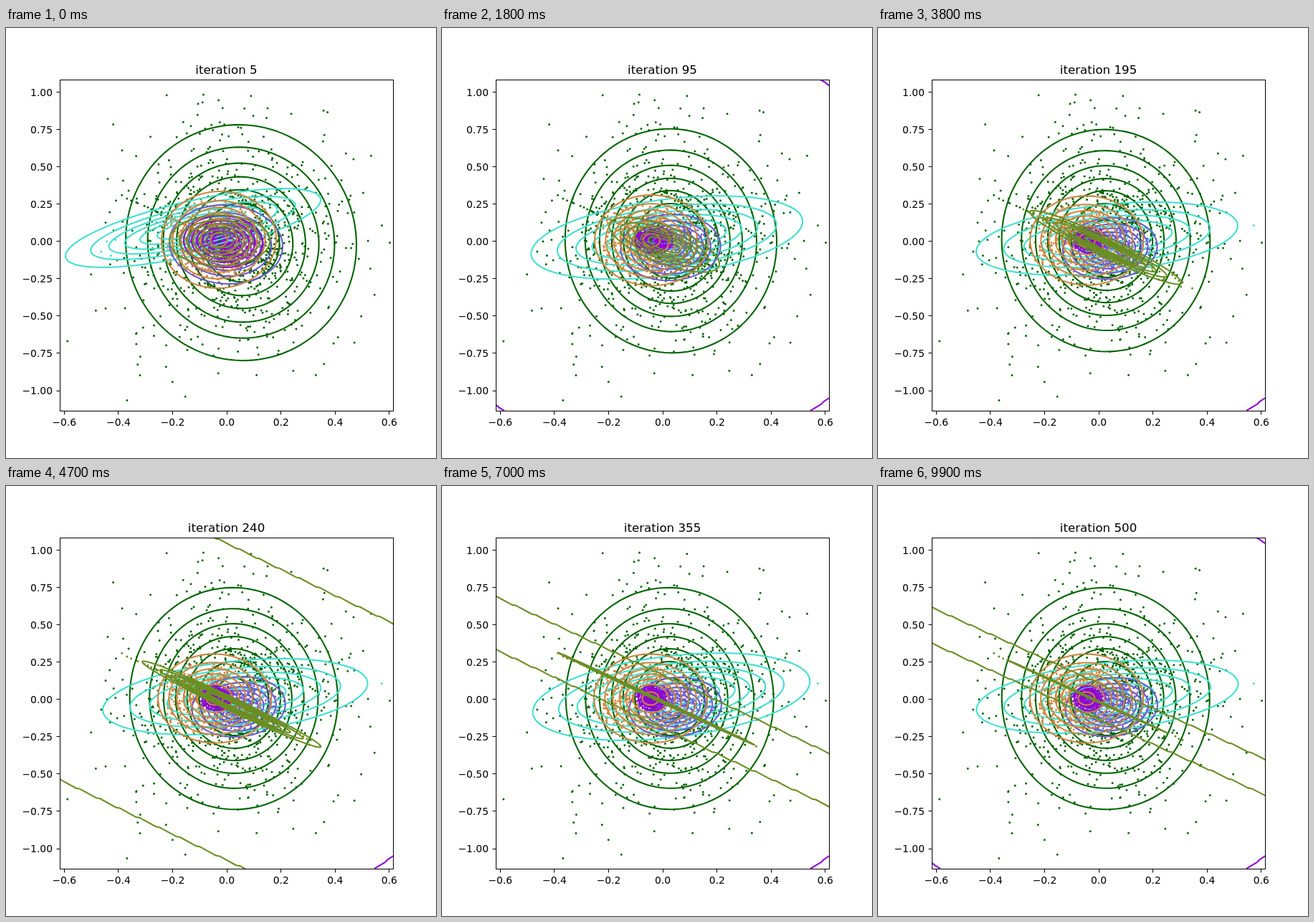
An HTML page with a canvas for the animation above (10000 ms loop, 600 px wide and 600 px high).

```html
<!DOCTYPE html>
<html>
<head>
<meta charset="utf-8">
<style>
html, body { margin: 0; width: 100%; height: 100%; overflow: hidden; background: #fff; }
canvas { display: block; }
</style>
</head>
<body>
<canvas id="stage" width="600" height="600"></canvas>
<script>
const ctx = document.getElementById('stage').getContext('2d');
const BOX = { l: 75, t: 72, r: 540, b: 534 };
const LAST = 99;
const OLIVE = '#6b8e23', VIOLET = '#9400d3';
const px = v => 308.1 + 378 * v;
const py = v => 297.8 - 208.2 * v;
const bell = (s, mid, width) => Math.exp(-(((s - mid) / width) ** 2));

// A pose is [cx, cy, half width, half height, correlation] of the outer ring.
const settle = (from, to, tau) => step =>
  to.map((v, i) => v + (from[i] - v) * Math.exp(-step / tau));

// The olive cluster flattens onto a line, growing and then shrinking along it.
const lineSlope = step => 0.505 - 0.0005 * step;
const flatness = step => Math.exp(-Math.min(7.9, 0.0042 * step ** 1.75));
function olivePose(step) {
  const cx = 292 + 26 * bell(step, 36, 30);
  const hx = 69 + 43 / (1 + Math.exp((30 - step) / 8)) + 34 * bell(step, 61, 17);
  const slope = lineSlope(step);
  return [cx, 295 + slope * (cx - 295), hx, hx * slope, Math.sqrt(1 - flatness(step))];
}

// The turquoise cluster keeps breathing after it has settled.
const breath = step => Math.sin((step - 53) * Math.PI / 30) * (1 - Math.exp(-step / 8));
const turquoiseBase = settle([261, 279, 178, 55, -0.71], [320, 294, 188, 56, -0.35], 8);
function turquoisePose(step) {
  const [cx, cy, hx, hy, rho] = turquoiseBase(step), b = breath(step);
  return [cx, cy, hx + 5.5 * b, hy + 5 * b, rho];
}

// peak: ratio of the density maximum to the step between contour levels.
const CLUSTERS = [
  { color: '#006400', count: 750, peak: () => 7.5,
    pose: settle([328, 299.5, 161, 164.5, 0.02], [317.7, 296.5, 145, 154.7, 0.01], 10) },
  { color: '#40e0d0', count: 60, peak: step => 7 + 0.7 * breath(step), pose: turquoisePose },
  { color: '#6a5acd', count: 300, peak: () => 7,
    pose: settle([307, 302, 79, 55, 0.05], [326, 308.5, 64, 41, -0.1], 18) },
  { color: VIOLET, count: 380, peak: () => 7,
    pose: settle([303, 298, 55, 36, 0.05], [295, 296, 21, 17, 0], 9) },
  { color: '#cd853f', count: 430, peak: () => 7.3,
    pose: settle([297, 295.5, 80, 67.5, -0.02], [291, 296.5, 79, 62, 0.01], 12) },
  { color: OLIVE, count: 140, peak: () => 7, pose: olivePose }
];
const total = CLUSTERS.reduce((sum, c) => sum + c.count, 0);

function gaussian(c, step) {
  const [cx, cy, hx, hy, rho] = c.pose(step), peak = c.peak(step);
  const reach = 2 * Math.log(peak), q = 1 - rho * rho;
  const scale = Math.log(c.count / total * reach / (hx * hy * Math.sqrt(q)));
  return { color: c.color, cx, cy, hx, hy, rho, peak, reach, q, scale };
}

// Maps unit-circle coordinates onto the outer ring.
const place = (g, u, v) =>
  [g.cx + g.hx * u, g.cy + g.hy * (g.rho * u + Math.sqrt(g.q) * v)];

let seed = 7;
function rand() {
  seed = (seed * 16807) % 2147483647;
  return seed / 2147483647;
}
const gauss = () => Math.sqrt(-2 * Math.log(rand())) * Math.cos(2 * Math.PI * rand());

// The data follow the settled clusters; the widest one has a heavier tail.
const points = [];
CLUSTERS.forEach((c, n) => {
  const g = gaussian(c, LAST), sigma = 1 / Math.sqrt(g.reach);
  for (let i = 0; i < c.count; i++) {
    const s = sigma * (n === 0 && i % 10 === 0 ? 1.6 : 1);
    points.push(place(g, s * gauss(), s * gauss()));
  }
});

function score(g, x, y) {
  const u = (x - g.cx) / g.hx, v = (y - g.cy) / g.hy;
  return g.scale - g.reach * (u * u - 2 * g.rho * u * v + v * v) / g.q / 2;
}

// Each point takes the colour of its most likely cluster.
function drawPoints(mix) {
  const groups = mix.map(() => new Path2D());
  for (const [x, y] of points) {
    const scores = mix.map(g => score(g, x, y));
    const path = groups[scores.indexOf(Math.max(...scores))];
    path.moveTo(x + 1.5, y);
    path.arc(x, y, 1.5, 0, 7);
  }
  mix.forEach((g, i) => {
    ctx.fillStyle = g.color;
    ctx.fill(groups[i]);
  });
}

function drawRings(g) {
  ctx.strokeStyle = g.color;
  ctx.beginPath();
  for (let k = 1; k < g.peak; k++) {
    const s = Math.sqrt(Math.log(g.peak / k) / Math.log(g.peak));
    for (let i = 0; i <= 120; i++) {
      const a = i * Math.PI / 60;
      const [x, y] = place(g, s * Math.cos(a), s * Math.sin(a));
      i ? ctx.lineTo(x, y) : ctx.moveTo(x, y);
    }
  }
  ctx.stroke();
}

// Two kinked lines that close in on the olive cluster.
function drawFarLines(step) {
  const slope = lineSlope(step), gap = 1300 * Math.sqrt(flatness(step)), run = 27.9;
  ctx.strokeStyle = OLIVE;
  ctx.beginPath();
  for (const side of [-1, 1]) {
    const lineY = x => 294 + slope * (x - 295) + side * gap;
    ctx.moveTo(BOX.l, lineY(BOX.l));
    for (let x = BOX.l + run; x < BOX.r + run; x += run) {
      ctx.lineTo(x - 5, lineY(x) - 0.8);
      ctx.lineTo(x, lineY(x));
    }
  }
  ctx.stroke();
}

function cutCorner(x, y, dx, dy, size) {
  if (size < 0.5) return;
  ctx.beginPath();
  ctx.moveTo(x + dx * size, y);
  ctx.lineTo(x + dx * size * 0.4, y + dy * size * 0.36);
  ctx.lineTo(x + dx * size * 0.3, y + dy * size * 0.48);
  ctx.lineTo(x, y + dy * size * 0.68);
  ctx.stroke();
}

function drawCorners(step) {
  const grown = 1 - Math.exp(-step / 3);
  const small = 12 * Math.cos((step - 16) / 13) * grown;
  ctx.strokeStyle = VIOLET;
  cutCorner(BOX.r, BOX.b, -1, -1, 26 * grown);
  cutCorner(BOX.r, BOX.t, -1, 1, small);
  cutCorner(BOX.l, BOX.b, 1, -1, small);
}

function drawAxes(step) {
  const label = (v, digits) => v.toFixed(digits).replace('-', '\u2212');
  ctx.strokeStyle = ctx.fillStyle = '#000';
  ctx.lineWidth = 1;
  ctx.strokeRect(75.5, 72.5, 465, 462);
  ctx.font = '13.89px "DejaVu Sans", sans-serif';
  ctx.beginPath();
  ctx.textAlign = 'center';
  for (let i = -3; i <= 3; i++) {
    const x = Math.floor(px(i / 5)) + 0.5;
    ctx.moveTo(x, 534.5);
    ctx.lineTo(x, 539.5);
    ctx.fillText(label(i / 5, 1), px(i / 5), 555);
  }
  ctx.textAlign = 'right';
  for (let i = -4; i <= 4; i++) {
    const y = Math.floor(py(i / 4)) + 0.5;
    ctx.moveTo(75.5, y);
    ctx.lineTo(70.5, y);
    ctx.fillText(label(i / 4, 2), 65, Math.round(py(i / 4) + 5));
  }
  ctx.stroke();
  ctx.textAlign = 'center';
  ctx.font = '16.67px "DejaVu Sans", sans-serif';
  ctx.fillText('iteration ' + 5 * (step + 1), 307.5, 64);
}

function draw(step) {
  ctx.fillStyle = '#fff';
  ctx.fillRect(0, 0, 600, 600);
  const mix = CLUSTERS.map(c => gaussian(c, step));
  ctx.save();
  ctx.beginPath();
  ctx.rect(BOX.l, BOX.t, BOX.r - BOX.l, BOX.b - BOX.t);
  ctx.clip();
  ctx.lineWidth = 2.08;
  ctx.lineJoin = 'round';
  drawPoints(mix);
  mix.forEach(drawRings);
  drawFarLines(step);
  drawCorners(step);
  ctx.restore();
  drawAxes(step);
}

let shown = -1;
function tick() {
  const step = Math.floor(performance.now() / 100) % (LAST + 1);
  if (step !== shown) draw(shown = step);
  requestAnimationFrame(tick);
}
tick();
</script>
</body>
</html>
```
